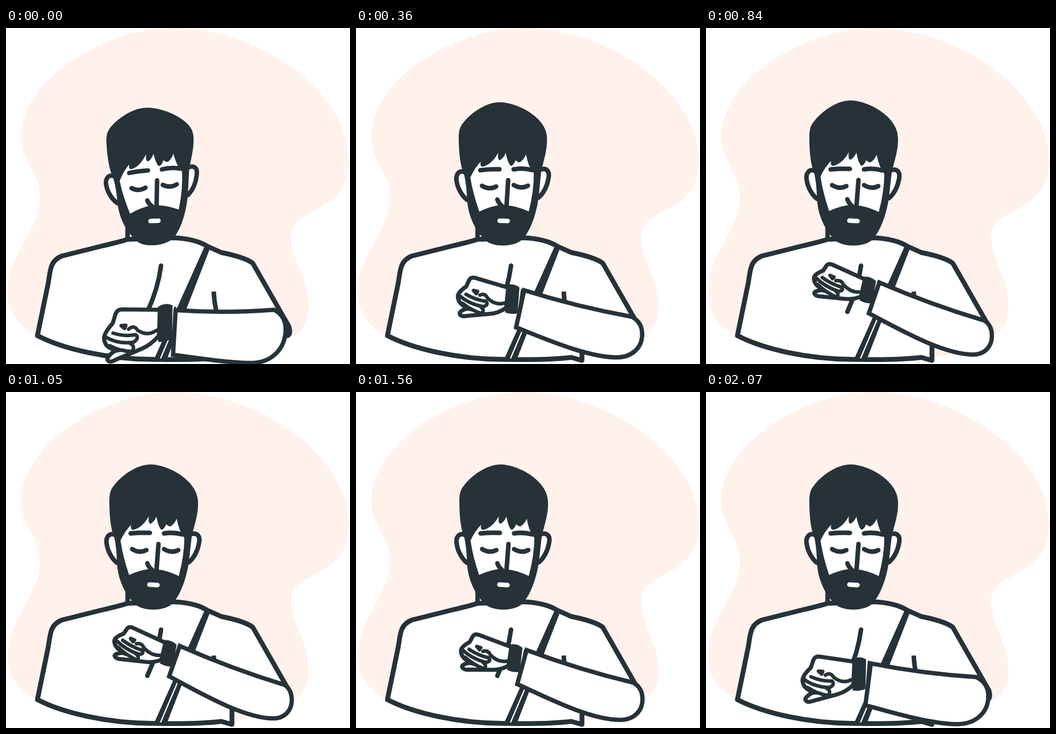
Animation of 679x663 px, one loop 2.1 s. Source, as an HTML page with a canvas:

```html
<!DOCTYPE html>
<html lang="en">
<head>
<meta charset="utf-8">
<title>Checking the time</title>
<style>
html, body { margin: 0; width: 100%; height: 100%; overflow: hidden; background: #fff; }
canvas { display: block; width: 679px; height: 663px; }
</style>
</head>
<body>
<canvas id="stage" width="679" height="663"></canvas>
<script>
const ctx = document.getElementById('stage').getContext('2d');
const INK = '#263238', WHITE = '#fff', BLUSH = '#fff1ec';
const LOOP = 2100, RISE = 1170, FALL_START = 1235, FALL = 1000;
const MID = 0.55;

const mix = (a, b, k) => a + (b - a) * k;
const between = (p, q, kx, ky = kx) => [mix(p[0], q[0], kx), mix(p[1], q[1], ky)];
const clamp = v => Math.min(1, Math.max(0, v));

// Share of the upward move still to go.
const remaining = (t, power) => (1 - clamp(t / RISE)) ** power;

// Arm height: quick rise with a soft stop, then a smooth partial drop.
function armLift(t) {
  const drop = 0.35 * (1 - Math.cos(Math.PI * clamp((t - FALL_START) / FALL)));
  return 1 - remaining(t, 3) - drop;
}

// Each joint follows a parabola through its low, middle and high place.
function joint(low, mid, high) {
  return u => low.map((v, i) =>
    v * (u - MID) * (u - 1) / MID +
    mid[i] * u * (u - 1) / (MID * (MID - 1)) +
    high[i] * u * (u - MID) / (1 - MID));
}

const ARM = {
  knuckle: joint([209, 558], [223, 504], [244, 464]),
  watch: joint([291, 620], [294, 572], [306, 537]),
  thumb: joint([189, 655], [202, 580], [215, 521]),
  cuffTop: joint([323, 557], [329, 524], [343, 501]),
  cuffBase: joint([318, 645], [315, 601], [322, 561]),
  elbowTop: joint([517, 556], [541, 567], [550, 578]),
  elbowSide: joint([540, 594], [563, 603], [564, 608]),
  elbowBase: joint([472, 661], [508, 652], [528, 644])
};

function draw(d, { fill, line, width = 9, cap = 'round', join = 'round', matrix } = {}) {
  const path = new Path2D();
  path.addPath(new Path2D(d), matrix || new DOMMatrix());
  if (fill) {
    ctx.fillStyle = fill;
    ctx.fill(path);
  }
  if (line) {
    ctx.strokeStyle = line;
    ctx.lineWidth = width;
    ctx.lineCap = cap;
    ctx.lineJoin = join;
    ctx.stroke(path);
  }
}

function drawBackground() {
  ctx.fillStyle = WHITE;
  ctx.fillRect(0, 0, 679, 663);
  draw(`M330 0 C198 0 30 100 30 215 C30 265 67 285 67 335 C67 400 3 450 3 520
    C3 560 25 590 62 607 L440 650 C480 647 520 635 560 612
    C585 600 597 580 597 550 C597 490 563 460 563 412
    C563 350 677 370 677 262 C677 125 497 0 330 0Z`, { fill: BLUSH });
}

function drawBody() {
  draw('M240 385 L240 425 L340 425 L340 385Z', { fill: WHITE });
  draw('M240 388 V416', { line: INK });
  draw(`M62 607 L83 505 C88 478 86 460 110 450 L190 430 Q225 422 240 417
    L330 414 C360 415 382 421 398 431 L425 443 C450 448 475 455 487 464
    L558 588 Q563 603 556 607 L446 600 L446 656 L425 650
    C400 653 360 655 300 654 C200 655 110 632 62 607Z`,
    { fill: WHITE, line: INK, width: 9.5 });
  draw('M306 469 Q300 515 279 560', { line: INK });
  draw('M392 431 L403 434 L317 655 L292 654Z', { fill: INK });
  draw('M339 572 L305 652', { line: WHITE, width: 2.5, cap: 'butt' });
  draw('M410 520 Q411 540 415 558', { line: INK, cap: 'butt' });
}

function drawHead(low) {
  const upright = [1, 0, 0, 1, 0, 0];
  const bowed = [0.979, -0.105, 0.058, 0.978, -13.9, 39];
  ctx.save();
  ctx.transform(...upright.map((v, i) => mix(v, bowed[i], low)));
  const ear = { fill: WHITE, line: INK };
  draw('M217 283 C203 275 196 288 199 301 C201 315 210 330 219 337', ear);
  draw('M364 281 C378 276 384 285 381 298 C378 315 370 328 361 336', ear);

  const x = 285 + 4 * low, top = 143 + 9 * low, tilt = 3 * low;
  draw(`M${x} ${top} C${x + 35} ${top + tilt} 379 ${175 + 12 * low} 379 217
    C380 245 370 265 366 290 L361 335 C356 370 343 403 328 418
    C312 433 271 433 255 419 C238 403 220 372 219 335 Q218 305 214 288
    C206 268 204 242 204 215 C204 200 207 192 212 186
    C228 ${164 + tilt} ${x - 26} ${top - tilt} ${x} ${top}Z`, { fill: INK });
  draw(`M226 293 Q235 274 247 262 Q244 275 255 271 Q271 265 282 245
    Q280 259 285 260 Q292 257 297 246 Q301 268 307 272 Q313 270 316 261
    Q322 266 325 265 Q333 260 337 250 Q341 274 352 288
    Q352 322 341 363 Q315 351 298 350 Q275 346 243 361 Q231 326 226 293Z`, { fill: WHITE });

  draw('M246 279 Q264 277 284 278 M312 279 Q330 276 348 281', { line: INK });
  draw('M249 310 Q263 319 277 312 M312 310 Q327 319 340 312', { line: INK });
  draw('M301 300 L297 352 M279 338 Q282 346 288 351', { line: INK });
  draw('M283 380 L299 381', { line: WHITE, width: 9 });
  ctx.restore();
}

// The hand is drawn once and fitted to knuckle, watch and thumb.
function drawHand({ knuckle, watch, thumb }) {
  const frame = (k, w, h) =>
    new DOMMatrix([w[0] - k[0], w[1] - k[1], h[0] - k[0], h[1] - k[1], ...k]);
  const rest = frame([231, 498], [295, 566], [201, 566]);
  const matrix = frame(knuckle, watch, thumb).multiply(rest.inverse());
  const ink = { line: INK, width: 7, matrix };
  draw('M304 517 L334 523 L318 566 L294 560Z', { fill: WHITE, matrix });
  draw(`M304 518 L238 498 Q230 496 226 502 L219 514 Q202 524 200 532
    Q199 545 212 552 L213 557 Q198 562 201 567 Q204 572 215 570
    L262 567 Q280 566 296 556Z`, { ...ink, fill: WHITE, width: 8 });
  draw(`M203 531 Q222 548 250 553 Q262 550 256 543 Q235 540 217 529
    M208 546 Q225 560 245 566 Q253 560 244 553 M214 557 Q228 556 240 566`, ink);
  draw('M233 522 L241 524 L238 528Z', { ...ink, fill: INK });
  draw('M245 531 Q256 527 260 537 Q275 552 294 547', ink);
  draw('M301 513 Q316 509 327 518 L318 567 Q305 570 293 565Z', { fill: INK, matrix });
  draw('M331 522 L320 566', { line: INK, width: 3, matrix });
}

function drawSleeve({ cuffTop, cuffBase, elbowTop, elbowSide, elbowBase }) {
  const sag = between(cuffTop, elbowTop, 0.5);
  sag[1] += 7;
  draw(`M${cuffTop} Q${sag} ${elbowTop}
    C${between(elbowTop, elbowSide, 0.65, 0.2)} ${between(elbowTop, elbowSide, 1, 0.55)} ${elbowSide}
    C${between(elbowSide, elbowBase, 0, 0.6)} ${between(elbowSide, elbowBase, 0.42, 1)} ${elbowBase}
    C${between(elbowBase, cuffBase, 0.29, 0)} ${between(cuffBase, elbowBase, 0.28, 0.37)} ${cuffBase}Z`,
    { fill: WHITE, line: INK, width: 8.5, join: 'miter' });
}

function render(t) {
  const lift = armLift(t), pose = {};
  for (const name in ARM) pose[name] = ARM[name](lift);
  drawBackground();
  drawBody();
  drawHead(remaining(t, 4));
  ctx.save();
  ctx.translate(12 * Math.exp(-t / 50), 0);
  drawHand(pose);
  drawSleeve(pose);
  ctx.restore();
}

const start = performance.now();
function tick(now) {
  render(Math.max(0, now - start) % LOOP);
  requestAnimationFrame(tick);
}
render(0);
requestAnimationFrame(tick);
</script>
</body>
</html>
```
